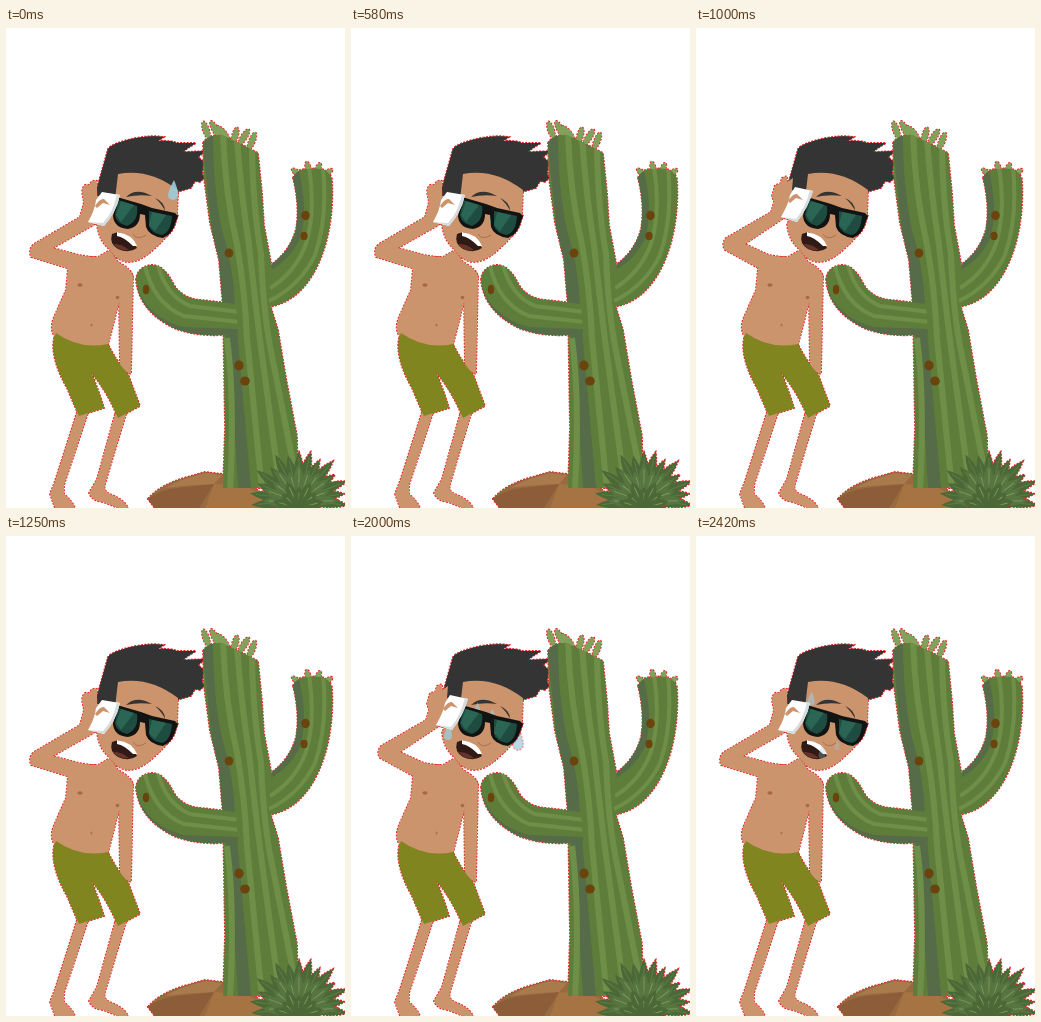
Animation, 339 px wide and 480 px high, one loop 2510 ms. Source, as an HTML page:

```html
<!DOCTYPE html>
<html lang="en">
<head>
<meta charset="utf-8">
<title>Desert heat</title>
<style>
html, body { margin: 0; width: 100%; height: 100%; overflow: hidden; background: #fff; }
svg { display: block; width: 100%; height: 100%; }
.edge { stroke: #e02424; stroke-width: 1.8; stroke-dasharray: 2 1.3; }
.skin { fill: #cc946c; }
.hair { fill: #343434; }
.frame { fill: #111413; }
.lens { fill: #1f4c41; }
.shine { fill: #2b6654; }
.shorts { fill: #80851f; }
.green { fill: #5f7d3a; }
.light { fill: none; stroke: #6f8f49; stroke-width: 6; }
.thin { stroke-width: 4; }
.shade { fill: #566b47; }
.bud { fill: #82a25c; }
.spot { fill: #6b430c; }
.line { fill: none; stroke: #a9724d; stroke-width: 1; }
.drop { fill: #9ccbdc; }
</style>
</head>
<body>
<svg viewBox="0 0 339 480" preserveAspectRatio="none">
  <defs>
    <path id="drop" d="M1-12Q5-3 5 3A5 5 0 0 1-5 3Q-4-3 1-12Z"/>
    <clipPath id="trunkClip"><path d="M197 115Q202 106 216 107L237 117L252 125L256 165L258 197L266 240L264 276L272 302L280 350L291 408L292 460L217 460L219 400L217 280L213 232L204 195L198 150Z"/></clipPath>
    <clipPath id="leftClip"><path d="M130 252Q131 239 145 237Q158 236 168 257Q177 271 196 272L230 276L232 305Q199 311 170 301Q133 284 130 252Z"/></clipPath>
    <clipPath id="rightClip"><path d="M287 150Q290 140 304 141Q322 138 326 151Q328 185 320 215Q309 253 287 269Q276 277 262 279L266 236Q284 223 290 201Q294 178 287 150Z"/></clipPath>
  </defs>

  <use href="#man" class="edge"/>
  <g id="man">
    <path class="skin" d="M71 384L49 453L44 466L49 480H69Q67 474 58 466L58 457L83 382Z"/>
    <path class="skin" d="M109 386L91 451L83 465Q86 473 97 474L112 480H122Q119 472 104 466Q97 463 99 456L121 383Z"/>
    <path class="skin" d="M112 240Q127 243 127 250L125 346L114 341L113 268Z"/>
    <path class="skin" d="M62 240Q72 228 92 229L104 222L112 234Q126 241 127 249L118 262Q112 275 109 290L102 317Q75 325 49 309Q43 301 48 289L60 262Z"/>
    <path class="shorts" d="M50 305Q74 322 102 316Q110 333 122 346L134 378L112 390Q102 365 85 344Q93 363 98 380L73 388L61 360Q44 330 48 310Z"/>
    <ellipse cx="74" cy="257" rx="2.6" ry="1.7" fill="#a56a40"/>
    <ellipse cx="111.500" cy="269.500" rx="1.8" ry="1.8" fill="#a56a40"/>
    <ellipse cx="85.500" cy="297" rx="1" ry="1.5" fill="#a9724d"/>

    <path class="hair" d="M91 160L102 121Q106 115 130 110Q146 107 158 109L152 113Q164 112 171 115L190 115L182 120L177 124L200 123L192 129L198 134L196 146L199 149L194 154L189 153L185 160L171 164L160 185H93Z"/>
    <path class="skin" d="M112 146Q143 140 172 162L171 188Q168 204 148 221Q135 234 122 234Q111 233 104 222Q92 212 91 195L108 180Z"/>
    <path class="hair" d="M120 169Q130 159 146 168Q133 166 120 169ZM149 170Q159 174 159 183Q156 176 149 170Z" stroke="none"/>
    <path d="M106 206Q103 216 112 221Q123 226 131 220Q124 207 112 204Z" fill="#301a15"/>
    <path d="M107 216Q115 215 123 222Q114 224 107 216Z" fill="#65332a"/>
    <path d="M111 204Q126 206 131 218L127 218Q118 209 111 208Z" fill="#fff"/>
    <path class="line" d="M127 206Q131 213 140 207"/>
    <g id="drops"></g>
    <path class="frame" d="M111 169L135 176L146 180L169 185L172 188L170 193Q167 206 157 210Q143 208 140 199L139 187L134 186Q134 199 122 201Q108 200 107 188Z"/>
    <path class="lens" d="M112 172L131 178Q133 193 121 198Q110 195 109 187ZM143 183L166 188Q165 204 156 207Q145 205 143 198Z"/>
    <path class="shine" d="M115 173L128 177L115 194L110 187ZM146 184L160 187L149 203L143 197Z"/>

    <g id="low">
      <path class="skin" d="M92 230L73 227L47 220L86 198L103 184L103 168L91 168L91 153Q87 151 83 157Q77 155 76 164L78 174L74 189L28 216Q22 221 25 229L64 241Z"/>
      <path d="M96 164L114 167Q110 185 98 198L82 194Q89 182 90 172Z" fill="#fff"/>
      <path d="M82 194L98 198Q110 185 114 167L111 166Q107 185 97 195Z" fill="#d6dcdd"/>
      <path class="skin" d="M89 178Q94 170 98 171L104 177L97 175L91 180Z"/>
    </g>
    <g id="high">
      <path class="skin" d="M92 230L73 227L49 216L88 190L104 178L106 165L96 162L97 150L91 154L91 148L86 150L84 156L79 157L76 168L78 174L75 184L30 210Q25 216 29 222L64 241Z"/>
      <path d="M99 159L117 163Q112 180 101 194L85 189Q93 175 94 167Z" fill="#fff"/>
      <path d="M85 189L101 194Q112 180 117 163L114 162Q109 181 100 191Z" fill="#d6dcdd"/>
      <path class="skin" d="M92 173Q97 165 101 166L107 172L100 170L94 175Z"/>
    </g>
  </g>

  <use href="#plant" class="edge"/>
  <g id="plant">
    <path d="M142 471Q153 457 181 449L199 444L216 446L245 457L258 467V480H149Z" fill="#986a40"/>
    <path d="M142 471Q155 460 181 459L208 456L193 480H149Z" fill="#8c5d38"/>
    <path d="M159 460Q179 449 200 445L216 447L208 456Q181 457 159 460Z" fill="#a97a4c"/>
    <path d="M208 456L240 458L256 468V480H199Z" fill="#a67343"/>
    <g id="buds"></g>
    <path class="green" d="M287 150Q290 140 304 141Q322 138 326 151Q328 185 320 215Q309 253 287 269Q276 277 262 279L266 236Q284 223 290 201Q294 178 287 150Z"/>
    <path class="green" d="M197 115Q202 106 216 107L237 117L252 125L256 165L258 197L266 240L264 276L272 302L280 350L291 408L292 460L217 460L219 400L217 280L213 232L204 195L198 150Z"/>
    <g clip-path="url(#rightClip)" stroke="none">
      <path class="shade" d="M287 148L293 143Q303 185 293 213Q283 232 265 242Z"/>
      <path class="light thin" d="M303 139Q310 183 300 216Q289 245 264 260M317 139Q322 190 309 227Q294 258 263 273"/>
    </g>
    <g clip-path="url(#trunkClip)" stroke="none">
      <path class="shade" d="M196 110L207 106Q207 160 216 202Q228 240 229 279L245 460H232L224 330L214 280Z"/>
      <path class="light" d="M217 105Q219 165 231 217Q239 263 241 310L256 462M231 110Q235 166 243 217Q249 272 254 312L274 462M246 120Q247 180 255 226Q257 280 264 318L291 455M221 310Q229 370 224 462"/>
    </g>
    <path class="green" d="M130 252Q131 239 145 237Q158 236 168 257Q177 271 196 272L230 276L232 305Q199 311 170 301Q133 284 130 252Z"/>
    <g clip-path="url(#leftClip)" stroke="none">
      <path class="shade" d="M129 252Q138 289 178 299L232 301V312H170Q129 293 129 252Z"/>
      <path class="light thin" d="M139 238Q148 276 178 288L234 294M152 237Q160 268 184 278L234 284"/>
    </g>
    <g id="spots" stroke="none"></g>
    <g id="bush"></g>
  </g>
</svg>
<script>
const $ = id => document.getElementById(id);
const make = (parent, tag, attrs) => {
  const el = document.createElementNS("http://www.w3.org/2000/svg", tag);
  for (const k in attrs) el.setAttribute(k, attrs[k]);
  return $(parent).appendChild(el);
};

// Buds: x, y, tilt
[[200, 102, -18], [209, 101, -28], [217, 105, -40], [229, 108, 15], [238, 109, 32], [246, 113, 22],
 [291, 145, -50], [302, 140, -12], [312, 141, 20], [321, 145, 55]].forEach(([x, y, a], i) => {
  const big = i < 6;
  make("buds", "ellipse", {
    class: "bud", rx: big ? 3 : 2.6, ry: big ? 9 : 6.5,
    transform: `translate(${x} ${y}) rotate(${a})`
  });
});

[[223, 225, 4.3, 4.5], [299.5, 187.5, 4.3, 4.7], [298, 208, 3.6, 4.2], [233, 337.5, 4.6, 5], [239, 353, 4.8, 4.5], [140, 261.5, 3.2, 4.8]]
  .forEach(([cx, cy, rx, ry]) => make("spots", "ellipse", { class: "spot", cx, cy, rx, ry }));

// Fans of leaves, back to front
const fan = (count, from, to, size, y, color, vein) => {
  for (let i = 0; i < count; i++) {
    const a = from + (to - from) * i / (count - 1);
    const n = size + 4 * Math.sin(i * 2.7);
    const place = `translate(293 ${y}) rotate(${a})`;
    make("bush", "path", { d: `M0 0Q${n * .55}-11 ${n} 0Q${n * .55} 9 0 0Z`, fill: color, transform: place });
    make("bush", "path", { d: `M8 0L${n - 6} 0`, fill: "none", stroke: vein, "stroke-width": 1, "stroke-dasharray": "none", transform: place });
  }
};
fan(15, -186, 6, 48, 472, "#4b6837", "#5d7c45");
fan(11, -178, -2, 36, 474, "#567540", "#7b995a");
fan(9, -190, 10, 25, 480, "#4b6837", "#7b995a");

// Sweat: x, y at start, start, life, speed, scale, opacity
const drops = [
  [167, 164, 0, 6, 8.4, 1, .9],
  [97, 164, 1, 6, 8.4, .8, .8],
  [141, 179, 5, 6, 6.2, .5, .7],
  [126, 175, 5, 6, 8.4, .7, .6],
  [115, 164, 10, 4, 8.4, .7, .6]
].map(d => ({ d, el: make("drops", "use", { href: "#drop", class: "drop" }) }));

const CYCLE = 19, LOOP = 2510, FRAME = 1000 / 12;
const start = performance.now();

function draw(now) {
  const t = Math.max(0, now - start) % LOOP;
  const frame = Math.min(29, Math.floor((t + 4) / FRAME));
  const phase = frame % CYCLE;
  const up = (phase >= 1 && phase <= 5) || (phase >= 11 && phase <= 14);
  $("high").style.display = up ? "" : "none";
  $("low").style.display = up ? "none" : "";
  for (const { d: [x, y, from, life, speed, size, alpha], el } of drops) {
    const age = phase - from;
    const seen = age >= 0 && age < life;
    el.style.display = seen ? "" : "none";
    if (!seen) continue;
    el.setAttribute("transform", `translate(${x} ${y + speed * age}) scale(${size})`);
    el.setAttribute("opacity", alpha * Math.min(1, (life - age) / 2));
  }
  requestAnimationFrame(draw);
}
draw(start);
</script>
</body>
</html>
```
